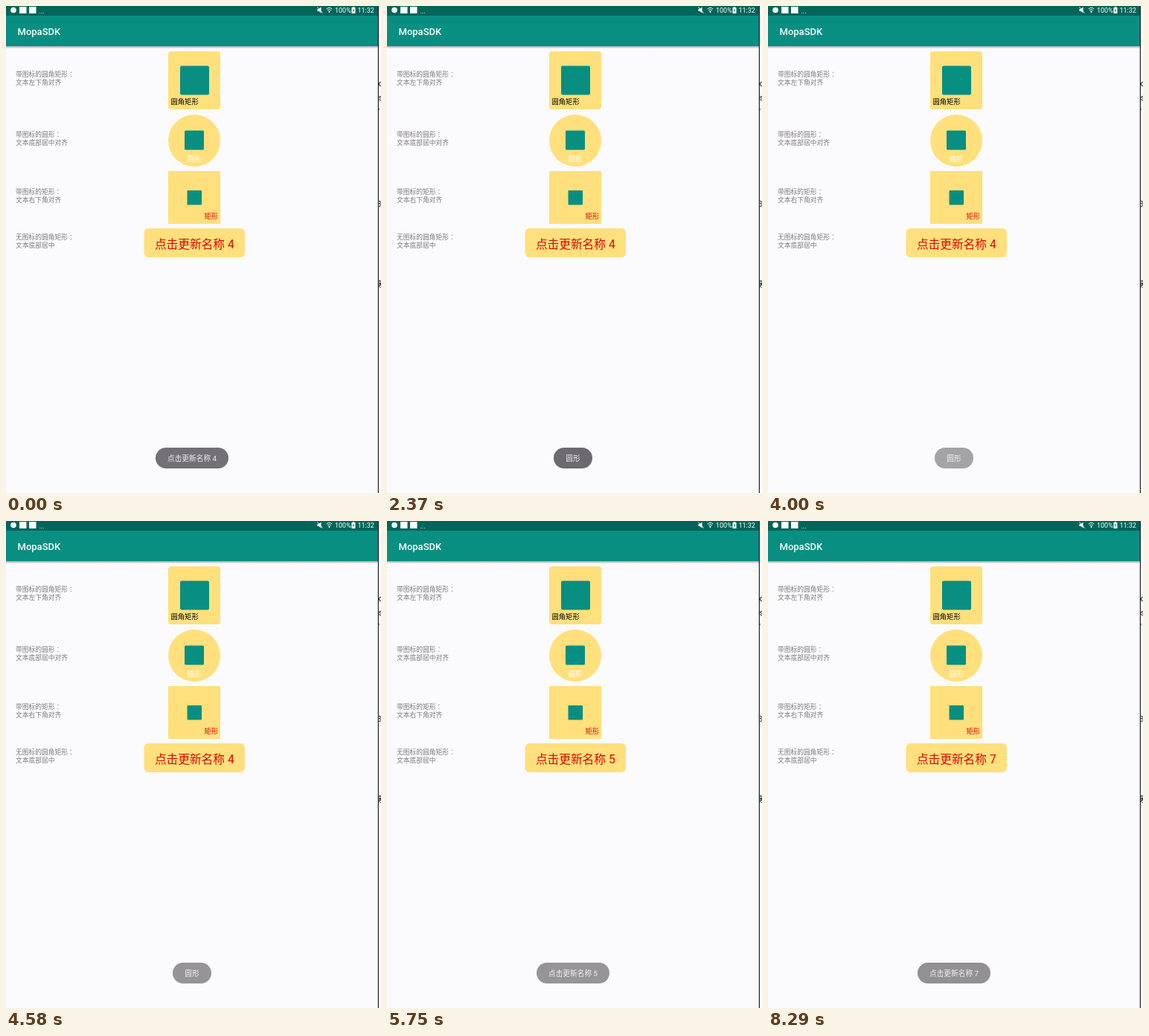
These frames come from a looping animation (504x655 px, 8740 ms). An HTML page:

```html
<!DOCTYPE html>
<html lang="zh-Hans">
<head>
<meta charset="utf-8">
<style>
html, body { margin: 0; width: 100%; height: 100%; overflow: hidden; background: #fbfafc; }
svg { display: block; width: 504px; height: 655px; font-family: Roboto, "Noto Sans CJK SC", "Noto Sans CJK", sans-serif; }
.label { font-size: 8.75px; fill: #7b797c; }
.colon { font-family: "Noto Sans CJK JP", "Noto Sans CJK", sans-serif; }
.card { fill: #ffe07c; }
.tile { fill: #088f82; }
.cap { font-size: 9.3px; }
.status { font-size: 9px; fill: #fff; }
.toast text { font-size: 9.7px; fill: #f1eff2; text-anchor: middle; }
.toast rect { fill: #6c6a6e; }
.edge { font-size: 11px; fill: #111; }
</style>
</head>
<body>
<svg viewBox="0 0 504 655">
  <defs>
    <linearGradient id="shade" x2="0" y2="1">
      <stop offset="0" stop-color="#000" stop-opacity=".32"/>
      <stop offset="1" stop-color="#000" stop-opacity="0"/>
    </linearGradient>
    <clipPath id="strip"><rect x="501" width="3" height="655"/></clipPath>
  </defs>
  <rect width="500" height="655" fill="#fbfafc"/>

  <!-- bars -->
  <rect y="54" width="500" height="3.5" fill="url(#shade)"/>
  <rect y="13" width="500" height="41" fill="#088f82"/>
  <rect width="500" height="13" fill="#03645a"/>
  <text x="15.5" y="39" font-size="13" font-weight="500" fill="#fff">MopaSDK</text>

  <!-- status icons -->
  <g fill="#fff">
    <circle cx="10" cy="5.5" r="3.8"/>
    <rect x="18" y="1" width="9.5" height="9"/>
    <rect x="31" y="1" width="9.5" height="9"/>
    <path d="M418.5 4h2l3-2.5v8l-3-2.5h-2z"/>
    <path d="M418.5 1.5l7 8" stroke="#fff" stroke-width="1"/>
    <path d="M433.2 7.2q1.3-1.2 2.6 0l-1.3 2.3z"/>
    <path d="M430.8 4q3.7-3.4 7.4 0M432.2 5.7q2.3-2 4.6 0" fill="none" stroke="#fff" stroke-width="1"/>
    <path d="M466 1h2v1h1.5v8h-5v-8h1.5z"/>
    <path d="M467.4 3.2l-1.6 3h1.1l-.4 2.6 1.7-3.2h-1.1z" fill="#03645a"/>
  </g>
  <g class="status">
    <text x="44.5" y="9.5">...</text>
    <text x="442" y="9">100%</text>
    <text x="472.5" y="9">11:32</text>
  </g>

  <g id="labels"></g>

  <!-- cards -->
  <rect class="card" x="218" y="61" width="70" height="78" rx="4"/>
  <rect class="tile" x="234" y="80.5" width="39" height="39" rx="2"/>
  <text class="cap" x="221.5" y="131.5">圆角矩形</text>

  <circle class="card" cx="253" cy="181" r="35"/>
  <rect class="tile" x="240" y="167.5" width="26" height="26" rx="1.5"/>
  <text class="cap" x="253" y="208.5" fill="#fff" text-anchor="middle">圆形</text>

  <rect class="card" x="218" y="222" width="70" height="71"/>
  <rect class="tile" x="243.5" y="248" width="19.5" height="19.5" rx="1"/>
  <text class="cap" x="266.5" y="285.5" fill="#d80808">矩形</text>

  <rect class="card" x="185.5" y="299" width="135.5" height="39" rx="6"/>
  <text id="button" x="253.3" y="326" font-size="15.7" fill="#d80808" text-anchor="middle"></text>

  <g id="toasts"></g>

  <!-- page behind the screen -->
  <rect x="501" width="3" height="655" fill="#fff"/>
  <rect x="499.8" width="1.2" height="655" fill="#222"/>
  <g class="edge" clip-path="url(#strip)">
    <text x="500.5" y="108">c</text>
    <text x="500.5" y="127">s</text>
    <text x="500" y="139">,</text>
    <text x="499" y="271">时</text>
    <text x="499" y="378">素</text>
  </g>
</svg>
<script>
const LOOP = 8740, TICK = 147.7;
const NS = "http://www.w3.org/2000/svg";
const $ = id => document.getElementById(id);
const BASE = "点击更新名称 ";

function add(parent, tag, attrs, text) {
  const el = document.createElementNS(NS, tag);
  for (const k in attrs) el.setAttribute(k, attrs[k]);
  if (text) el.textContent = text;
  return parent.appendChild(el);
}

[
  [95, "带图标的圆角矩形", "文本左下角对齐"],
  [176, "带图标的圆形", "文本底部居中对齐"],
  [253, "带图标的矩形", "文本右下角对齐"],
  [314, "无图标的圆角矩形", "文本底部居中"]
].forEach(([y, head, note]) => {
  const line = add($("labels"), "text", { class: "label", x: 13, y }, head);
  add(line, "tspan", { class: "colon", lang: "ja" }, "：");
  add($("labels"), "text", { class: "label", x: 13, y: y + 11 }, note);
});

// Fades, one opacity per tick
const FADE_IN = [0.15, 0.6, 0.9, 1];
const CROSS_OUT = [0.7, 0.15, 0];
const FIRST_OUT = [0.95, 0.86, 0.62, 0.36, 0.16, 0.05, 0];
const LAST_OUT = [0.97, 0.92, 0.84, 0.73];

const toasts = [
  { text: BASE + 4, w: 98, start: -9, end: 0, out: FIRST_OUT },
  { text: "圆形", w: 52, start: 11 },
  { text: "圆角矩形", w: 72, start: 20 },
  { text: "圆形", w: 52, start: 26 },
  { text: "矩形", w: 52, start: 32 },
  { text: BASE + 5, w: 98, start: 36 },
  { text: BASE + 6, w: 98, start: 39 },
  { text: BASE + 7, w: 98, start: 42, end: 53, out: LAST_OUT }
];
toasts.forEach((t, i) => {
  t.end ??= toasts[i + 1].start - 1;
  t.out ??= CROSS_OUT;
  t.el = add($("toasts"), "g", { class: "toast" });
  add(t.el, "rect", { x: 250 - t.w / 2, y: 594, width: t.w, height: 28, rx: 14 });
  add(t.el, "text", { x: 250, y: 611.7 }, t.text);
});

const pick = (list, i) => list[Math.min(i, list.length - 1)];

function alpha(t, tick) {
  if (tick < t.start) return 0;
  return tick < t.end ? pick(FADE_IN, tick - t.start) : pick(t.out, tick - t.end);
}

function draw(now) {
  const tick = Math.floor((now % LOOP + 10) / TICK);
  for (const t of toasts) t.el.setAttribute("opacity", alpha(t, tick));
  const count = 4 + [36, 39, 42].filter(n => tick >= n).length;
  $("button").textContent = BASE + count;
}

let origin;
function loop(now) {
  origin ??= now;
  draw(now - origin);
  requestAnimationFrame(loop);
}
draw(0);
requestAnimationFrame(loop);
</script>
</body>
</html>
```
